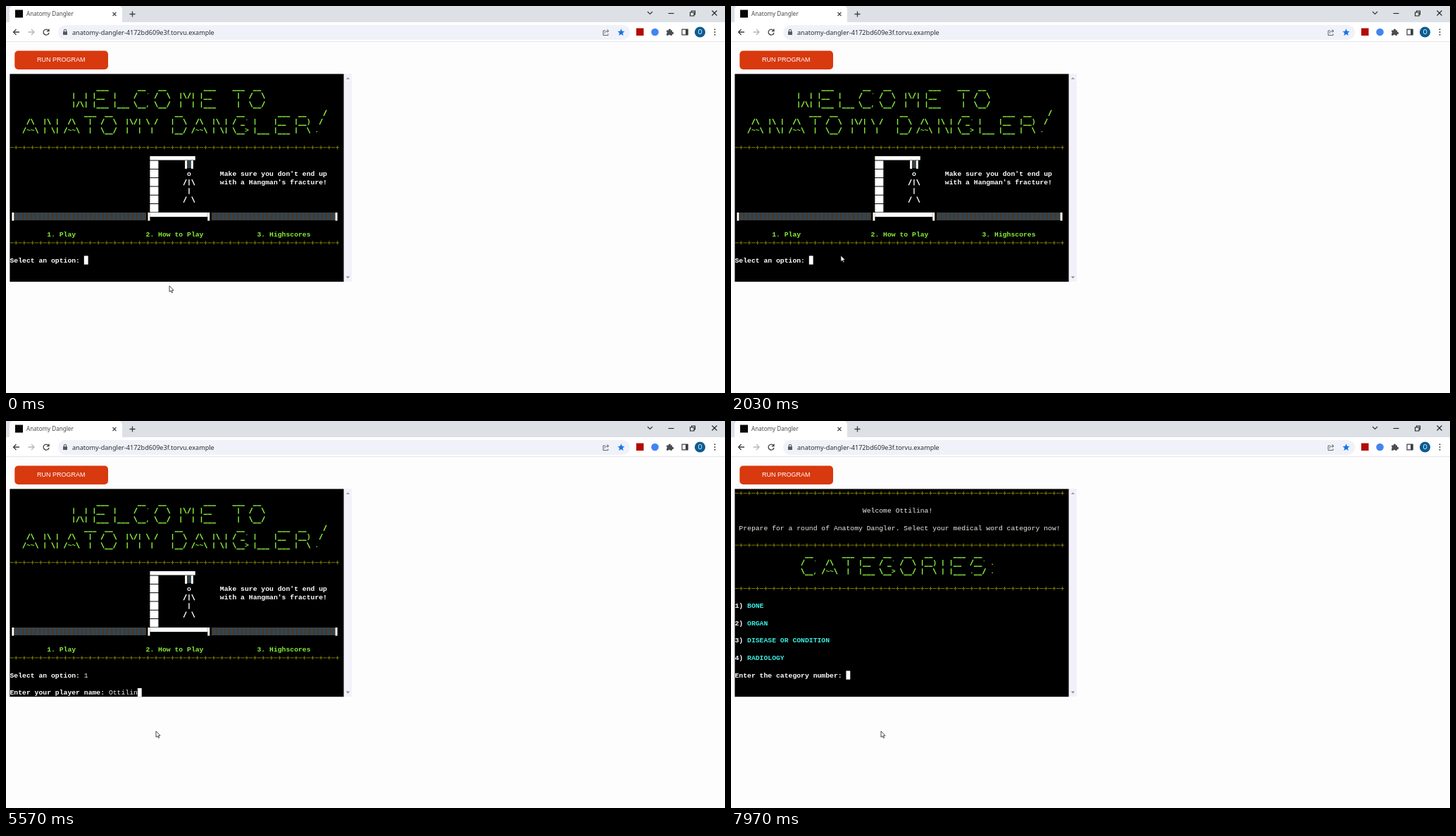
Write an HTML page with a canvas that moves like this. It is 1021 px wide and 549 px high and loops after 8000 ms.

```html
<!DOCTYPE html>
<html lang="en">
<head>
<meta charset="utf-8">
<title>Anatomy Dangler</title>
<style>
  html, body { margin: 0; width: 100%; height: 100%; overflow: hidden; background: #fdfdfd; }
  canvas { display: block; }
</style>
</head>
<body>
<canvas id="stage" width="1021" height="549"></canvas>
<script>
const ctx = document.getElementById('stage').getContext('2d');
const LOOP = 8000;
const PLAYER = 'Ottilina';
const GAME = 'Anatomy Dangler';
const WHITE = '#fff', PLAIN = '#ecece8', GREEN = '#88ee3a', YELLOW = '#948c00', CYAN = '#3aeee2';

// Terminal grid
const LEFT = 5.5, TOP = 96.3, CW = 5.85, RH = 12.29;

const glyphs = {
  A: ['', ' /\\', '/~~\\'],         C: [' __', '/  `', '\\__,'],
  D: [' __', '|  \\', '|__/'],      E: [' ___', '|__', '|___'],
  G: [' __', '/ _`', '\\__>'],      I: ['', '|', '|'],
  L: ['', '|', '|___'],             M: ['', ' |\\/|', ' |  |'],
  N: ['', '|\\ |', '| \\|'],        O: [' __', '/  \\', '\\__/'],
  R: [' __', '|__)', '|  \\'],      S: [' __', '/__`', '.__/'],
  T: ['___', ' |', ' |'],           W: ['', '|  |', '|/\\|'],
  Y: ['', '\\ /', ' |'],            ':': ['', '.', '.'],
  ' ': ['  ', '', '']
};

// Line characters, drawn as strokes within one cell
const strokes = {
  '_': 'M.1 11.5H5.8',
  '|': 'M2.9 2.3V10.8',
  '/': 'M4.9 2.2L1 10.4',
  '\\': 'M1 2.2L4.9 10.4',
  '-': 'M.4 6.1H5.4',
  '+': 'M.4 6.1H5.4M2.9 3.5V8.7'
};

function rect(x, y, w, h, color) {
  ctx.fillStyle = color;
  ctx.fillRect(x, y, w, h);
}

function pill(x, y, w, h, r, color) {
  ctx.fillStyle = color;
  ctx.beginPath();
  ctx.roundRect(x, y, w, h, r);
  ctx.fill();
}

function disc(x, y, r, color) {
  ctx.fillStyle = color;
  ctx.beginPath();
  ctx.arc(x, y, r, 0, 7);
  ctx.fill();
}

function path(d, x, y, stroke, fill, width = 1.1) {
  const p = new Path2D(d);
  ctx.save();
  ctx.translate(x, y);
  if (fill) { ctx.fillStyle = fill; ctx.fill(p); }
  if (stroke) { ctx.strokeStyle = stroke; ctx.lineWidth = width; ctx.stroke(p); }
  ctx.restore();
}

function label(text, x, y, font, color, align = 'left') {
  ctx.font = font;
  ctx.fillStyle = color;
  ctx.textAlign = align;
  ctx.fillText(text, x, y);
}

function put(text, col, row, color, bold = true) {
  const font = `${bold ? 'bold ' : ''}9.75px "Courier New", "Liberation Mono", monospace`;
  [...text].forEach((ch, i) => {
    const x = LEFT + (col + i) * CW, y = TOP + row * RH;
    if (strokes[ch]) path(strokes[ch], x, y, color, null, bold ? 1.4 : 0.9);
    else if (ch !== ' ') label(ch, x, y + 9.2, font, color);
  });
}

function banner(word, col, row) {
  for (const ch of word) {
    const lines = glyphs[ch];
    lines.forEach((line, i) => put(line, col, row + i, GREEN));
    col += Math.max(...lines.map(line => line.length)) + 1;
  }
}

// Block in cell units
function block(col, row, w = 1, h = 1, color = WHITE) {
  rect(LEFT + col * CW, TOP + row * RH, w * CW, h * RH, color);
}

function shade(col, row, count) {
  const x0 = Math.round(LEFT + col * CW), x1 = LEFT + (col + count) * CW;
  const y0 = Math.round(TOP + row * RH);
  for (let y = 0; y < 11; y++)
    for (let x = x0 + y % 2, i = 0; x < x1; x += 2, i++)
      rect(x, y0 + y, 1, 1, i % 3 ? '#6688a0' : '#94724e');
}

const divider = row => put('-+'.repeat(40), 0, row, YELLOW, false);

function drawBrowser() {
  const dark = '#3c4043', ui = '"Segoe UI", "Open Sans", sans-serif';
  rect(0, 0, 1021, 549, '#fdfdfd');
  rect(0, 0, 1021, 23, '#dde1e6');
  pill(5, 0, 160, 30, 5, '#fff');
  rect(0, 23, 1021, 27, '#fff');
  rect(0, 50, 1021, 1, '#e3e5e8');

  rect(13, 5.5, 11, 11, '#080808');
  label(GAME, 29, 14, `8.1px ${ui}`, '#45494d');
  path('M-2.5-2.5L2.5 2.5M2.5-2.5L-2.5 2.5', 154, 11.5, dark);
  path('M-4 0H4M0-4V4', 179.5, 11.5, dark, null, 1.3);
  path('M-3.5-2L0 1.5L3.5-2', 914.5, 10, '#333');
  path('M-4 0H4', 944.5, 10.5, '#222');
  path('M-3.5-1.5H2V3.5H-3.5ZM-1.5-1.5V-3.5H3.5V1.5H2', 975, 10.5, '#222');
  path('M-3.5-3.5L3.5 3.5M3.5-3.5L-3.5 3.5', 1006, 10, '#222');

  path('M4.5 0H-4M0-4L-4 0L0 4', 14.5, 37, dark, null, 1.3);
  path('M-4.5 0H4M0-4L4 0L0 4', 36, 37, '#b4b7ba', null, 1.3);
  path('M3.3-2.3A4 4 0 1 0 4 1M4-4.5V-1.3H.8', 57, 37, dark, null, 1.3);

  pill(74, 27, 812, 21, 10.5, '#f0f2f9');
  path('M-3-.8H3V4H-3Z', 84, 37, null, '#55595d');
  path('M-1.7-.5V-2A1.7 1.7 0 0 1 1.7-2V-.5', 84, 37, '#55595d');
  label('anatomy-dangler-4172bd609e3f.torvu.example', 94, 40.5, `9.1px ${ui}`, '#2b2e31');
  path('M-1-2.5H-4V4H3V2M-2 1.5C-2-1 0-2 3-2M1.5-4.2L4-2L1.5 .2', 852, 37.5, '#5f6368', null, 1);
  path('M0-5L1.5-1.6L5-1.3L2.3 1L3.2 4.6L0 2.7L-3.2 4.6L-2.3 1L-5-1.3L-1.5-1.6Z', 873.5, 37.3, null, '#1a73e8');

  rect(895, 31.5, 10.5, 10.5, '#b30b00');
  disc(921.5, 37, 5.3, '#4285f0');
  path('M-4.5-2.5H-1.5A1.5 1.5 0 1 1 1.3-2.5H3.5V0A1.5 1.5 0 1 1 3.5 2.8V4.8H.8A1.5 1.5 0 0 0-2 4.8H-4.5V2.2A1.5 1.5 0 0 0-4.5-.4Z', 942.5, 37, null, '#4a4d51');
  path('M-4-3.8H4V3.8H-4Z', 964, 37, dark, null, 1.2);
  rect(965, 33, 3.5, 8, dark);
  disc(985.5, 37, 7.6, '#0b5c91');
  label(PLAYER[0], 985.5, 40, `8px ${ui}`, '#fff', 'center');
  for (const y of [33.3, 37, 40.7]) disc(1006.5, y, 1, dark);

  pill(12.3, 63.6, 132.7, 26.4, 5, '#d8390f');
  label('RUN PROGRAM', 78.3, 79.4, '9px Arial, "Liberation Sans", sans-serif', '#fff', 'center');

  rect(480, 96, 11, 295, '#f2f1fa');
  path('M-2.7 1.5L0-1.5L2.7 1.5Z', 485.5, 102.5, null, '#a0a0a4');
  path('M-2.7-1.5L0 1.5L2.7-1.5Z', 485.5, 385, null, '#8c8c90');
  rect(5.4, 96.4, 474.2, 294.8, '#000');
}

function drawGallows() {
  block(34, 9.5, 11, 0.45);
  for (let row = 10; row < 16; row++) block(34, row + 0.03, 2.05, 0.92);
  block(42.5, 10, 0.5, 0.95);
  shade(43, 10, 1);
  block(44, 10, 0.5, 0.95);
  put('o', 43, 11, WHITE);
  put('/|\\', 42, 12, WHITE);
  put('|', 43, 13, WHITE);
  put('/ \\', 42, 14, WHITE);

  block(0.5, 16, 0.5, 0.95);
  shade(1, 16, 32);
  block(33.5, 16, 0.5, 0.95);
  block(34, 16, 14, 0.5);
  block(48, 16, 0.5, 0.95);
  shade(49, 16, 30);
  block(79, 16, 0.5, 0.95);
}

function drawMenu(t) {
  banner('WELCOME TO', 15, 1);
  banner('ANATOMY', 3, 4);
  banner('DANGLER', 39, 4);
  put('/', 76, 4, GREEN);
  put('/', 75, 5, GREEN);
  put('.', 74, 6, GREEN);
  divider(8);
  drawGallows();
  put("Make sure you don't end up", 51, 11, WHITE);
  put("with a Hangman's fracture!", 51, 12, WHITE);
  put('1. Play', 9, 18, GREEN);
  put('2. How to Play', 33, 18, GREEN);
  put('3. Highscores', 60, 18, GREEN);
  divider(19);

  put('Select an option:', 0, 21, WHITE);
  const chosen = t >= 3200;
  if (chosen) put('1', 18, 21, PLAIN, false);
  if (t < 4050) return block(chosen ? 19 : 18, 21);

  const typed = Math.max(0, Math.min(PLAYER.length, Math.floor((t - 4600) / 150) + 1));
  put('Enter your player name:', 0, 23, WHITE);
  put(PLAYER.slice(0, typed), 24, 23, PLAIN, false);
  block(24 + typed, 23);
}

function drawCategories(t) {
  divider(0);
  put(`Welcome ${PLAYER}!`, 31, 2, PLAIN, false);
  put(`Prepare for a round of ${GAME}. Select your medical word category now!`, 1, 4, PLAIN, false);
  divider(6);
  if (t < 6950) return block(0, 7);

  banner('CATEGORIES:', 16, 7);
  divider(11);
  ['BONE', 'ORGAN', 'DISEASE OR CONDITION', 'RADIOLOGY'].forEach((name, i) => {
    put(`${i + 1})`, 0, 13 + 2 * i, WHITE);
    put(name, 3, 13 + 2 * i, CYAN);
  });
  put('Enter the category number:', 0, 21, WHITE);
  block(27, 21);
}

function drawPointer(t) {
  const ease = (from, to) => {
    const k = Math.max(0, Math.min(1, (t - from) / (to - from)));
    return k * k * (3 - 2 * k);
  };
  const out = ease(1480, 1950), back = ease(2300, 2800);
  path('M0 0V8.5L2 6.8L3.4 9.8L4.7 9.2L3.4 6.3H6Z',
    232 - 76 * out + 57 * back, 397 - 43 * out + 86 * back, '#222', '#fff', 0.8);
}

function frame(now) {
  const t = now % LOOP;
  drawBrowser();
  (t < 6050 ? drawMenu : drawCategories)(t);
  drawPointer(t);
  requestAnimationFrame(frame);
}
requestAnimationFrame(frame);
</script>
</body>
</html>
```
